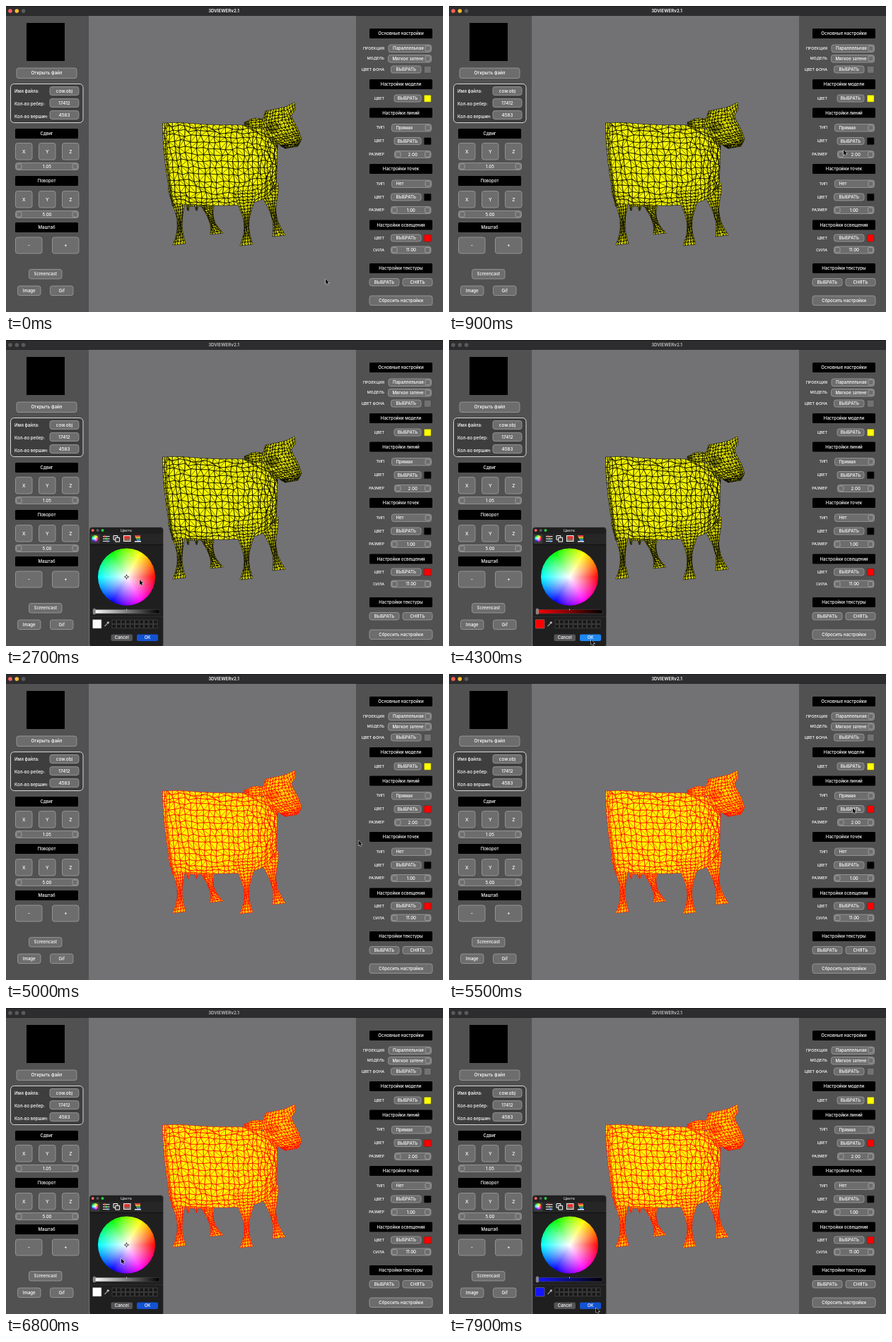
An HTML page with a canvas for the animation above (8 s loop, 618 by 434 pixels).

```html
<!DOCTYPE html>
<html lang="ru">
<head>
<meta charset="utf-8">
<title>3DVIEWERv2.1</title>
<style>
html, body { margin: 0; width: 100%; height: 100%; overflow: hidden; background: #515151; }
canvas { display: block; }
</style>
</head>
<body>
<canvas id="stage" width="618" height="434"></canvas>
<script>
const c = document.getElementById('stage').getContext('2d');
const LOOP = 8000;
const FONT = 'Inter, "Open Sans", sans-serif';
const PANEL = '#515151', VIEW = '#727274';

const mix = (a, b, k) => a + (b - a) * k;
const clamp = k => Math.min(1, Math.max(0, k));
const ease = k => clamp(k) ** 2 * (3 - 2 * clamp(k));
const hump = k => Math.sin(Math.PI * k);

// ---------- drawing helpers ----------
function text(str, x, y, size = 6.1, align = 'center', weight = 500, color = '#fff') {
  c.font = `${weight} ${size}px ${FONT}`;
  c.textAlign = align;
  c.textBaseline = 'middle';
  c.fillStyle = color;
  c.fillText(str, x, y + 0.3);
}

function rect(x, y, w, h, fill) {
  c.fillStyle = fill;
  c.fillRect(x, y, w, h);
}

function box(x, y, w, h, fill, line, r = 3, lw = 0.8) {
  c.beginPath();
  c.roundRect(x, y, w, h, r);
  if (fill) { c.fillStyle = fill; c.fill(); }
  if (line) { c.strokeStyle = line; c.lineWidth = lw; c.stroke(); }
}

function dot(x, y, r, fill) {
  c.beginPath();
  c.arc(x, y, r, 0, 7);
  c.fillStyle = fill;
  c.fill();
}

function button(str, x, y, w, h = 10.5, size = 6.1) {
  box(x, y, w, h, '#6d6d6e', '#a0a0a0');
  text(str, x + w / 2, y + h / 2, size);
}

function header(str, x, y) {
  box(x, y, 89, 14, '#000', null, 1.5);
  text(str, x + 44.5, y + 7);
}

const notch = (x, y) => box(x, y + 1.5, 7, 7.2, null, '#b0b0b0', 1.5, 0.7);

function spin(str, x, y, w) {
  button(str, x, y, w, 10);
  notch(x + 1.5, y);
  notch(x + w - 8.5, y);
}

// ---------- cow mesh ----------
let seed = 11;
const random = () => (seed = seed * 16807 % 2147483647) / 2147483647;

// Triangulated strip; edge(u) gives the two end points [ax, ay, bx, by] of a row.
function strip(edge, rows, cols, wobble = 1.2) {
  const grid = [], skin = new Path2D(), wires = new Path2D();
  for (let i = 0; i <= rows; i++) {
    const [ax, ay, bx, by] = edge(i / rows);
    grid.push([]);
    for (let j = 0; j <= cols; j++) {
      const u = j / cols, v = mix(u, 0.5 - 0.5 * Math.cos(Math.PI * u), 0.45);
      const free = i % rows && j % cols ? wobble : 0;
      grid[i].push([mix(ax, bx, v) + (random() - 0.5) * free, mix(ay, by, v) + (random() - 0.5) * free]);
    }
  }
  const line = (path, ...points) => points.forEach((p, i) => path[i ? 'lineTo' : 'moveTo'](...p));
  line(skin, ...grid[0], ...grid.map(r => r[cols]), ...grid[rows].slice().reverse(),
    ...grid.map(r => r[0]).reverse());
  for (let i = 0; i < rows; i++) for (let j = 0; j < cols; j++) {
    const a = grid[i][j], b = grid[i][j + 1], d = grid[i + 1][j], e = grid[i + 1][j + 1];
    line(wires, a, b, e, d, a);
    if (random() < 0.6) line(wires, a, e);
    else line(wires, b, d);
  }
  return { skin, wires };
}

// Edge rule running through a few rows.
const through = (...keys) => u => {
  const k = Math.min(Math.floor(u * (keys.length - 1)), keys.length - 2);
  return keys[k].map((v, q) => mix(v, keys[k + 1][q], u * (keys.length - 1) - k));
};

// Wide thigh, thin shin, flared hoof.
const leg = (x, y, w, footX, footY, bend) => strip(u => {
  const half = mix(w, 7, ease(u / 0.62)) / 2 + 5.5 * clamp((u - 0.72) / 0.28) ** 1.4;
  const mid = mix(x, footX, u) + bend * hump(u), level = mix(y, footY, u);
  return [mid - half, level + 1, mid + half, level - 1];
}, 18, 5);

function trunk(u) {
  const q = u ** 0.8, s = mix(q, 0.5 - 0.5 * Math.cos(Math.PI * q), 0.6);
  return [
    222 + 162 * s, 161.5 + 7 * hump(s) + 6 * (1 - s) ** 12 + 32 * s ** 8,
    236 + 146 * s, 280 + 3 * hump(s) - 22 * s ** 8,
  ];
}

function eyeRings(x, y) {
  const wires = new Path2D();
  for (let r = 1.5; r < 9; r += 1.8) {
    wires.moveTo(x + r, y);
    wires.ellipse(x, y, r, r * 0.9, 0, 0, 7);
  }
  return { skin: new Path2D(), wires };
}

const tail = u => {
  const x = 221.5 + 14 * u ** 1.8, y = mix(166, 284, u);
  return [x, y, x + mix(6, 2.5, u), y];
};
const teat = x => strip(u => [x + u * 1.5, 280 + u * 10, x + 5 - u * 1.5, 280 + u * 10], 3, 2, 0.5);

const cow = [
  leg(283, 270, 24, 298, 323, -2),
  leg(370, 252, 29, 386, 326, -1),
  ...[255, 267, 278].map(teat),
  strip(u => [253 + 6 * u, 275 + 9 * u, 286 - 9 * u, 275 + 9 * u], 3, 7),
  leg(242, 258, 25, 245, 338, 2),
  strip(trunk, 24, 15, 4),
  leg(338, 262, 30, 340, 339, 1),
  strip(tail, 16, 2),
  strip(through([337, 165, 338, 170], [350, 159, 351, 175], [364, 160, 364, 172]), 5, 5),
  strip(through([367, 149, 401, 142], [361, 168, 405, 160], [372, 187, 414, 177],
    [388, 198, 418, 189], [395, 202, 413, 199]), 16, 11, 1.8),
  strip(through([393, 144, 400, 160], [408, 137, 409, 147]), 4, 3, 1),
  eyeRings(377, 172),
];

function drawCow(color) {
  c.strokeStyle = color;
  c.lineJoin = 'round';
  c.lineWidth = 0.6;
  for (const { skin, wires } of cow) {
    c.fillStyle = '#ff0';
    c.fill(skin);
    c.stroke(wires);
  }
}

// ---------- panels ----------
function drawWindow(active) {
  rect(0, 0, 618, 434, PANEL);
  rect(117, 13, 378, 421, VIEW);
  rect(0, 0, 618, 13.5, '#2d2d2f');
  rect(0, 0, 618, 0.8, '#161617');
  rect(0, 13, 618, 0.7, '#1d1d1e');
  ['#ff5f57', '#febc2e', '#5a5a5c']
    .forEach((color, i) => dot(6 + i * 9.3, 7, 2.8, active ? color : '#5a5a5c'));
  text('3DVIEWERv2.1', 308, 6.8, 6.1, 'center', 700, active ? '#e8e8e8' : '#b4b4b4');
}

function drawLeft() {
  rect(29, 24, 54, 54, '#000');
  button('Открыть файл', 15, 88, 85, 14.5, 6.3);
  box(6.5, 110.5, 102.5, 55, '#3e3e3f', '#d8d8d8', 5, 1);
  ['Имя файла:', 'Кол-во ребер:', 'Кол-во вершин:']
    .forEach((name, i) => text(name, 12, 120.5 + i * 18, 6.1, 'left'));
  ['cow.obj', '17412', '4583'].forEach((value, i) => button(value, 62, 114.5 + i * 17, 41, 12, 6.3));
  header('Сдвиг', 13, 174);
  header('Поворот', 13, 241);
  header('Маштаб', 13, 307);
  for (const y of [194.5, 262.5])
    ['X', 'Y', 'Z'].forEach((axis, i) => button(axis, 13.5 + i * 33, y, 23.5, 23.5, 6.6));
  spin('1.05', 13.5, 222.5, 89);
  spin('5.00', 13.5, 290.5, 89);
  button('-', 13.5, 328, 37.5, 23, 7);
  button('+', 65.5, 328, 37.5, 23, 7);
  button('Screencast', 32.5, 373.5, 46.5, 13.5, 6);
  button('Image', 16.5, 397, 32.5, 13.5);
  button('Gif', 62.5, 397, 32.5, 13.5);
}

const label = (name, y) => text(name, 535, y + 5, 5.4, 'right');

function comboRow(name, y, value, x) {
  label(name, y);
  box(x, y, 601.5 - x, 10.5, '#6d6d6e', '#a0a0a0');
  text(value, x + 6, y + 5.2, 6.1, 'left');
  notch(593, y);
}

function colorRow(name, y, color, x = 544.5) {
  label(name, y);
  button('ВЫБРАТЬ', x, y, 587 - x, 10);
  box(591.2, y + 0.2, 10, 10, color, '#333', 1, 0.5);
}

function spinRow(name, y, value, x = 544.5) {
  label(name, y);
  spin(value, x, y, 601 - x);
}

function drawRight(lineColor) {
  header('Основные настройки', 514, 32);
  comboRow('ПРОЕКЦИЯ', 55, 'Параллельная', 541);
  comboRow('МОДЕЛЬ', 69.5, 'Мягкое затене', 540.5);
  colorRow('ЦВЕТ ФОНА', 85, VIEW);
  header('Настройки модели', 514, 104);
  colorRow('ЦВЕТ', 126, '#ff0', 549);
  header('Настройки линий', 514, 144.5);
  comboRow('ТИП', 167.5, 'Прямая', 545.5);
  colorRow('ЦВЕТ', 186.5, lineColor, 549);
  spinRow('РАЗМЕР', 205.5, '2.00', 549.5);
  header('Настройки точек', 514, 224);
  comboRow('ТИП', 247, 'Нет', 545.5);
  colorRow('ЦВЕТ', 266, '#000');
  spinRow('РАЗМЕР', 284.5, '1.00');
  header('Настройки освещения', 514, 303.5);
  colorRow('ЦВЕТ', 324, '#f00');
  spinRow('СИЛА', 341, '11.00');
  header('Настройки текстуры', 514, 365);
  button('ВЫБРАТЬ', 514, 386.5, 42);
  button('СНЯТЬ', 561, 386.5, 42);
  button('Сбросить настройки', 514, 411, 89, 13.5);
}

// ---------- colour dialog ----------
function wheel(x, y, r) {
  const hues = c.createConicGradient(0, x, y);
  for (let i = 0; i <= 6; i++) hues.addColorStop(i / 6, `hsl(${360 - i * 60} 100% 50%)`);
  const glow = c.createRadialGradient(x, y, 0, x, y, r);
  glow.addColorStop(0, '#fff');
  glow.addColorStop(1, '#fff0');
  dot(x, y, r, hues);
  dot(x, y, r, glow);
}

function drawIcons() {
  box(119.5, 275.5, 13, 13, '#3a3a3c', null, 2);
  wheel(126, 281.5, 4.6);
  ['#f55', '#5d5', '#59f'].forEach((color, i) => {
    rect(137, 278 + i * 3.4, 9.5, 1.2, '#ddd');
    rect(139 + i * 2, 277.2 + i * 3.4, 1.8, 2.8, color);
  });
  for (const d of [0, 2.8]) box(152 + d, 277.5 + d, 5.8, 5.8, '#333', '#fff', 0, 1);
  rect(166, 277, 10.5, 9, '#eee');
  rect(167, 278, 8.5, 4, '#d33');
  rect(167, 282, 8.5, 3, '#865');
  ['#e44', '#fb3', '#4a4', '#38f'].forEach((color, i) => rect(182 + i, 277 + i * 2, 8 - i, 1.8, color));
  rect(182, 285, 9, 1.5, '#eee');
}

function crosshair(x, y) {
  c.beginPath();
  c.arc(x, y, 1.8, 0, 7);
  for (const d of [-1, 1]) {
    c.moveTo(x + d * 1.8, y);
    c.lineTo(x + d * 3.6, y);
    c.moveTo(x, y + d * 1.8);
    c.lineTo(x, y + d * 3.6);
  }
  c.strokeStyle = '#222';
  c.lineWidth = 0.8;
  c.stroke();
}

function drawDialog(color, pressed) {
  box(118, 265.5, 104.5, 170, '#1f1f20', '#606062', 4, 0.7);
  rect(118.5, 275, 103.5, 15, '#262627');
  rect(118.5, 290, 103.5, 0.7, '#090909');
  ['#ff5f57', '#58585a', '#28c840'].forEach((light, i) => dot(122.7 + i * 6.9, 270, 2, light));
  text('Цвета', 170, 270, 5.4, 'center', 500, '#cfcfcf');
  drawIcons();
  wheel(170.5, 336, 40.5);
  if (color === '#fff') crosshair(170.5, 336);
  const shade = c.createLinearGradient(124, 0, 217, 0);
  shade.addColorStop(0, color);
  shade.addColorStop(1, '#000');
  box(123.5, 382.3, 93.5, 5.7, shade, '#48484a', 1, 0.6);
  rect(170, 381.6, 1, 1.6, '#ddd');
  box(123.2, 381, 3.4, 8, '#858587', '#aaa', 1.5, 0.5);
  rect(118.5, 392, 103.5, 0.6, '#343435');
  box(122.5, 396.5, 12.5, 12.5, color, '#777', 0.5, 0.6);
  c.beginPath();
  c.moveTo(139.5, 406);
  c.lineTo(143.3, 402);
  c.strokeStyle = '#9a9a9a';
  c.lineWidth = 1.2;
  c.stroke();
  dot(144.3, 400.8, 1.6, '#bbb');
  for (let i = 0; i < 20; i++)
    box(150 + i % 10 * 6.5, 397 + Math.floor(i / 10) * 6.3, 5.6, 5.4, '#171717', '#4b4b4c', 0, 0.7);
  box(148.5, 417.5, 30.5, 9.5, '#555557', null, 2);
  text('Cancel', 163.7, 422.2, 6);
  box(185, 417.5, 30, 9.5, pressed ? '#1f87f0' : '#1353d2', null, 2);
  text('OK', 200, 422.2, 6);
}

// ---------- pointer ----------
const arrow = new Path2D('M0 0V7.2L1.7 5.7 2.8 8.2 4 7.7 2.9 5.3H5.2Z');

function drawPointer(t) {
  let x = 452, y = 387;
  const move = (start, time, toX, toY) => {
    const k = ease((t - start) / time);
    x = mix(x, toX, k);
    y = mix(y, toY, k);
  };
  move(0, 900, 558, 204);
  move(900, 300, 567, 190);
  move(1800, 900, 189, 340);
  move(2700, 400, 207, 337);
  move(3600, 500, 201, 425);
  move(4600, 560, 571, 190);
  move(5750, 150, 538, 203);
  move(5900, 700, 180, 335);
  move(6600, 350, 152, 368);
  move(7200, 500, 208, 425);
  c.save();
  c.translate(x, y);
  c.strokeStyle = '#fff';
  c.lineWidth = 1;
  c.stroke(arrow);
  c.fillStyle = '#000';
  c.fill(arrow);
  c.restore();
}

function frame(now) {
  const t = now % LOOP;
  const first = t >= 1900 && t < 4400, second = t >= 5900;
  const lineColor = t < 4400 ? '#000' : '#f00';
  drawWindow(!first && !second);
  drawLeft();
  drawRight(lineColor);
  drawCow(lineColor);
  if (first) drawDialog(t < 3100 ? '#fff' : '#f00', t >= 4300);
  if (second) drawDialog(t < 6950 ? '#fff' : '#1414ff', false);
  drawPointer(t);
  requestAnimationFrame(frame);
}
requestAnimationFrame(frame);
</script>
</body>
</html>
```
